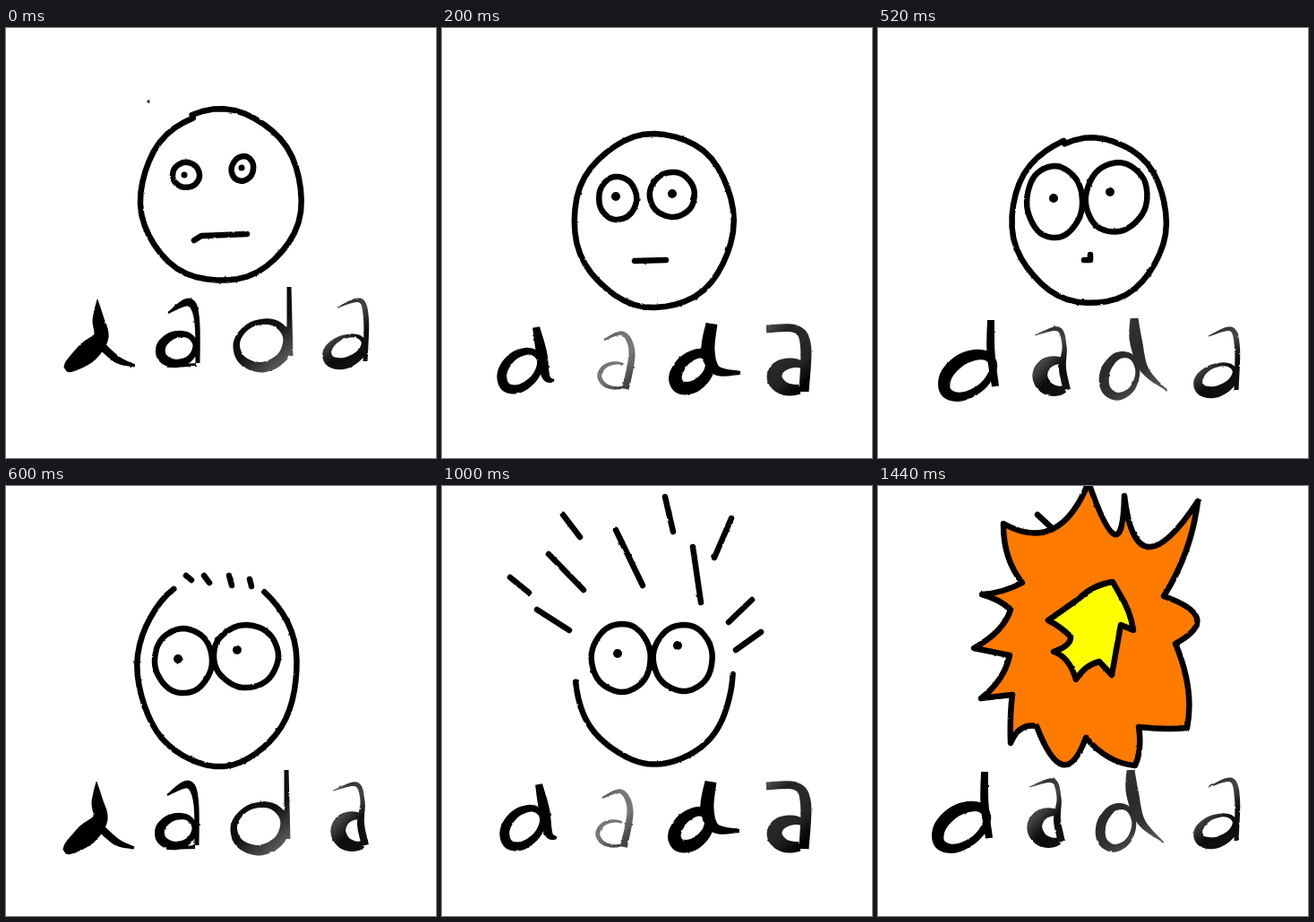
An HTML page for the animation above (1.6 s loop, 480 by 480 pixels).

```html
<!DOCTYPE html>
<html lang="en">
<head>
<meta charset="utf-8">
<title>dada</title>
<style>
html, body { margin: 0; width: 100%; height: 100%; overflow: hidden; background: #fff; }
svg { display: block; width: 100%; height: 100%; }
.pen { fill: none; stroke: #000; stroke-width: 6.5; stroke-linecap: round; stroke-linejoin: round; }
</style>
</head>
<body>
<svg id="stage" viewBox="0 0 480 480">
  <defs>
    <filter id="rough" filterUnits="userSpaceOnUse" x="0" y="0" width="480" height="480" color-interpolation-filters="sRGB">
      <feTurbulence type="fractalNoise" baseFrequency="0.16" numOctaves="2" seed="4"/>
      <feDisplacementMap in="SourceGraphic" scale="2" xChannelSelector="R" yChannelSelector="G"/>
    </filter>
  </defs>
</svg>
<script>
const stage = document.getElementById('stage');

function add(parent, tag, attrs) {
  const el = document.createElementNS('http://www.w3.org/2000/svg', tag);
  for (const key in attrs) el.setAttribute(key, attrs[key]);
  return parent.appendChild(el);
}

// Diagonal ink shading from top left to bottom right, evenly spaced tones.
function ink(id, ...tones) {
  const grad = add(stage.querySelector('defs'), 'linearGradient', { id, x1: 0, y1: 0, x2: .6, y2: 1 });
  tones.forEach((c, i) => add(grad, 'stop', { offset: i / (tones.length - 1), 'stop-color': c }));
  return `url(#${id})`;
}

const low = ink('low', '#000', '#0a0a0a', '#111', '#555');
const wash = ink('wash', '#999', '#333', '#444', '#0c0c0c', '#111');
const pale = ink('pale', '#444', '#777', '#777', '#444');
const stem = ink('stem', '#444', '#333', '#2a2a2a', '#333', '#555');
const block = ink('block', '#555', '#222', '#2a2a2a', '#222', '#000');

const poly = (pts, end = '') => 'M' + pts.map(p => p[0].toFixed(1) + ' ' + p[1].toFixed(1)).join('L') + end;

// Points [x, y, angle] along a tilted ellipse; angles in degrees, 0 right, 90 down.
function arc(cx, cy, rx, ry, tilt = 0, from = 0, to = 360, grow = 0) {
  const n = 48, rad = Math.PI / 180, c = Math.cos(tilt * rad), s = Math.sin(tilt * rad);
  return Array.from({ length: n + 1 }, (_, i) => {
    const a = (from + (to - from) * i / n) * rad;
    const r = 1 + grow * (i / n - .5) + .008 * Math.sin(3 * a + cx) + .006 * Math.sin(7 * a + cy);
    const x = rx * r * Math.cos(a), y = ry * r * Math.sin(a);
    return [cx + x * c - y * s, cy + x * s + y * c, a];
  });
}

// Catmull-Rom spline through key points of any dimension.
function spline(pts, steps = 8) {
  const out = [], at = i => pts[Math.max(0, Math.min(pts.length - 1, i))];
  for (let i = 0; i < pts.length - 1; i++) {
    const [a, b, c, d] = [at(i - 1), at(i), at(i + 1), at(i + 2)];
    for (let k = 0; k < steps; k++) {
      const t = k / steps;
      out.push(b.map((v, j) => v + t / 2 * (c[j] - a[j] +
        t * (2 * a[j] - 5 * v + 4 * c[j] - d[j] + t * (3 * (v - c[j]) + d[j] - a[j])))));
    }
  }
  return [...out, at(pts.length - 1)];
}

// Outline of a line of [x, y, width] points.
function outline(mid) {
  const left = [], right = [];
  mid.forEach(([x, y, w], i) => {
    const p = mid[Math.max(0, i - 1)], q = mid[Math.min(mid.length - 1, i + 1)];
    const dx = q[0] - p[0], dy = q[1] - p[1], r = w / 2 / (Math.hypot(dx, dy) || 1);
    left.push([x - dy * r, y + dx * r]);
    right.unshift([x + dy * r, y - dx * r]);
  });
  return poly([...left, ...right], 'Z');
}

const parse = s => s.split(' ').map(p => p.split(',').map(Number));
const brush = s => outline(spline(parse(s)));

// Round brush stroke, broadest at the angle `peak`.
const bowl = (thin, fat, peak, ...shape) => outline(arc(...shape).map(([x, y, a]) =>
  [x, y, thin + (fat - thin) * (1 + Math.cos(a - peak * Math.PI / 180)) / 2]));

const letter = (fill, ...parts) => ({ fill, d: parts.join('') });

const glyphs = {
  lam: letter(ink('blot', '#000', '#000', '#000'),
    brush('102,303,1 103,325,13 106,345,17 91,362,24 72,377,15 66,381,6'), brush('104,352,9 124,370,8 144,377,3')),
  aHook: letter('#000', brush('181,318,2 204,306,9 213,325,6 214,374,5'),
    bowl(6, 11, 180, 192, 358, 20, 16, -20), brush('180,378,2 212,376,4')),
  dOpen: letter(low, brush('316,289,5 317,366,7'), bowl(6, 12, 80, 286, 353, 29, 25, -20)),
  aGrey: letter(wash, brush('370,312,1 395,304,5 402,325,6 401,372,5'), bowl(4, 13, 130, 379, 359, 22, 14, -25)),
  dInk: letter('#000', brush('105,334,8 111,362,12 116,389,9 125,394,3'), bowl(7, 11, 200, 88, 382, 25, 17, -45)),
  aThin: letter(pale, brush('181,348,2 202,341,5 212,362,7 205,403,8'), bowl(2, 5, 180, 194, 388, 18, 14, 0, 300, 50)),
  dBold: letter('#000', brush('301,330,13 297,360,15 306,382,11 333,385,4'), bowl(10, 15, 180, 280, 383, 23, 15, -45)),
  aBlock: letter(block, brush('362,336,9 395,336,9 406,355,12 404,406,11'), bowl(6, 17, 170, 392, 389, 21, 15, 0, 300, 70)),
  dBlack: letter('#000', brush('126,326,8 126,362,9 131,400,8'), bowl(8, 14, 240, 101, 388, 31, 19, -35)),
  aWash: letter(wash, brush('175,343,1 201,336,5 208,355,5 206,380,8 211,404,8'), bowl(4, 17, 170, 199, 388, 18, 17, 0, 290, 60)),
  dWash: letter(stem, brush('286,324,9 288,350,14 298,382,9 323,405,1'), bowl(5, 11, 150, 271, 388, 18, 24, 20))
};

// head: an ellipse arc; eyes: [pupil x, pupil y, ellipse]; marks: x1,y1 x2,y2 strokes.
const poses = [
  { head: [239, 188, 90, 95, 0, -110, 250, -.04],
    eyes: [[199, 164, 201, 164, 15, 14], [263, 156, 264, 157, 12, 14, 20]],
    marks: ['210,237 218,232 269,230'],
    word: [['lam', 0, 0], ['aHook', 0, 0], ['dOpen', 0, 0], ['aGrey', 0, 0]] },
  { head: [237, 215, 89, 97],
    eyes: [[194, 188, 196, 190, 21, 24], [257, 185, 257, 186, 25, 25]],
    marks: ['215,260 250,259'],
    word: [['dInk', 0, 0], ['aThin', 0, 0], ['dBold', 0, 0], ['aBlock', 0, 0]] },
  { head: [237, 214, 86, 93, 0, -110, 250, .04],
    eyes: [[196, 190, 197, 194, 31, 40], [259, 183, 266, 189, 34, 39, 15]],
    marks: ['230,259 237,259 237,253'],
    word: [['dBlack', 0, 0], ['aWash', 0, 0], ['dWash', 0, 0], ['aGrey', -1, 32]] },
  { head: [236, 205, 89, 107, 0, -54, 237],
    eyes: [[192, 193, 198, 195, 32, 36], [258, 183, 268, 190, 36, 35]],
    marks: ['201,100 207,105', '221,100 227,108', '249,100 252,111', '272,104 274,112'],
    word: [['lam', -1, 27], ['aHook', -1, 27], ['dOpen', -3, 28], ['aWash', 190, -3]] },
  { head: [238, 207, 93, 105, 0, -24, 211],
    eyes: [[192, 190, 197, 194, 37, 39], [263, 181, 270, 191, 34, 37]],
    marks: ['138,124 152,132', '175,90 171,117', '208,74 210,113', '253,78 246,104', '309,87 291,114', '336,103 311,122'],
    word: [['dWash', -194, 3], ['aBlock', -199, 0], ['dBlack', 189, -4], ['aHook', 182, 28]] },
  { head: [237, 210, 88, 100, 0, 0, 175],
    eyes: [[196, 187, 200, 192, 33, 38], [263, 178, 269, 192, 33, 37]],
    marks: ['135,32 154,57', '76,102 97,119', '119,76 158,116', '106,138 142,161', '194,49 224,111',
      '249,12 258,51', '280,68 289,130', '323,36 304,80', '346,127 320,152', '356,163 328,183'],
    word: [['dInk', 3, -1], ['aThin', -2, 0], ['dBold', -1, 0], ['aBlock', 0, -1]] },
  { word: [['dBlack', -7, -7], ['aWash', -6, -7], ['dWash', -4, -7], ['aGrey', -1, 24]] }
];

// Closed outline of alternating tips and hollows; each curve passes through its hollow.
function spikes(s) {
  const pts = parse(s);
  let d = 'M' + pts[0];
  for (let i = 0; i < pts.length; i += 2) {
    const [a, v, b] = [pts[i], pts[i + 1], pts[(i + 2) % pts.length]];
    d += 'Q' + v.map((m, j) => 2 * m - (a[j] + b[j]) / 2) + ' ' + b;
  }
  return d + 'Z';
}

function drawBlast(g) {
  const rim = spikes('140,42 195,48 235,-4 264,54 275,11 302,68 357,17 344,72 319,123 356,148 332,176 346,225 ' +
    '345,270 320,271 291,269 292,292 287,312 258,303 232,281 206,311 177,268 160,271 148,287 148,258 150,233 132,235 ' +
    '115,237 136,215 147,189 127,185 107,181 134,161 148,138 134,128 116,121 139,117 161,108 145,78');
  const core = 'M221 128L190 150Q204 157 215 168Q216 178 196 185Q213 190 221 216Q231 200 247 196L261 211L271 155L285 161Q282 140 270 121L262 107Q240 110 224 126';
  add(g, 'path', { d: rim, class: 'pen', style: 'fill:#ff7b00' });
  add(g, 'path', { d: core, class: 'pen', style: 'fill:#ff0' });
  add(g, 'path', { d: 'M178 32L193 46', class: 'pen' });
}

function drawFace(g, { head, eyes, marks }) {
  const lines = [arc(...head), ...marks.map(parse), ...eyes.map(([, , ...shape]) => arc(...shape))];
  add(g, 'path', { d: lines.map(l => poly(l)).join(''), class: 'pen' });
  for (const [cx, cy, , , size] of eyes)
    add(g, 'circle', { cx, cy, r: size < 20 ? 3.5 : 5 });
}

const groups = poses.map(pose => {
  const g = add(stage, 'g', { filter: 'url(#rough)', display: 'none' });
  if (pose.head) drawFace(g, pose);
  else drawBlast(g);
  for (const [name, dx, dy] of pose.word)
    add(g, 'path', { ...glyphs[name], transform: `translate(${dx} ${dy})` });
  return g;
});
add(groups[0], 'ellipse', { cx: 159.5, cy: 82, rx: 1, ry: 2 });

const loop = 1600, beat = 200;

function render(ms) {
  const now = Math.min(poses.length - 1, Math.floor(ms % loop / beat));
  groups.forEach((g, i) => g.setAttribute('display', i === now ? 'inline' : 'none'));
}

function tick() {
  render(performance.now());
  requestAnimationFrame(tick);
}
tick();
</script>
</body>
</html>
```
